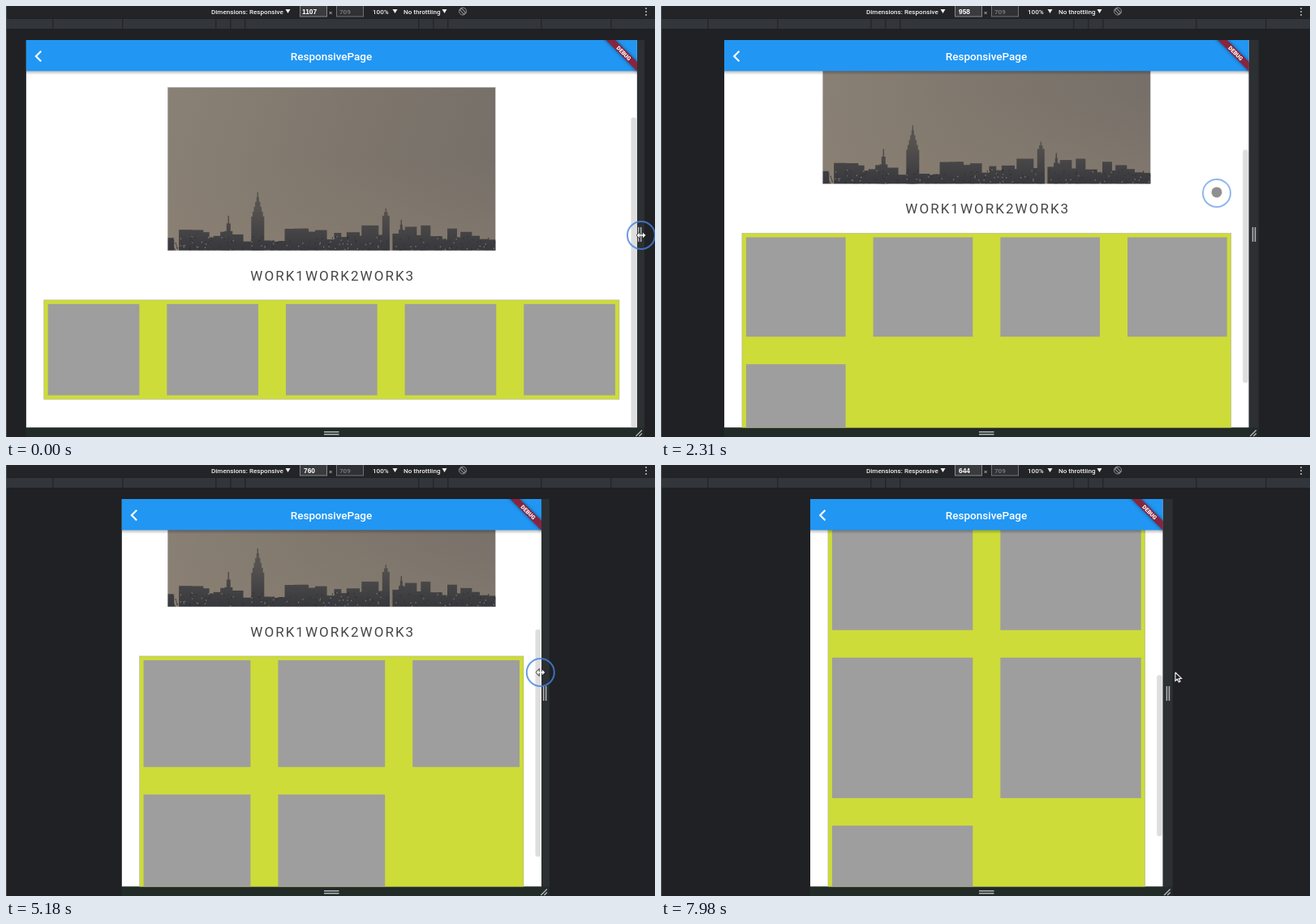
An HTML page with a canvas that plays this animation: 800 by 532 pixels, repeating every 8 s.

```html
<!DOCTYPE html>
<html lang="en">
<head>
<meta charset="utf-8">
<title>Responsive page</title>
<style>
  html, body { margin: 0; width: 100%; height: 100%; overflow: hidden; background: #202124; }
  canvas { display: block; }
</style>
</head>
<body>
<canvas id="stage" width="800" height="532"></canvas>
<script>
const ctx = document.getElementById('stage').getContext('2d');
const LOOP = 8000, CENTER = 401.3, HALF_SCALE = 0.3376, PAGE_LAG = 50;
const TOP = 42, VIEW_TOP = 80, VIEW_BOTTOM = 520.5, VIEW = VIEW_BOTTOM - VIEW_TOP;
const PHOTO_TOP = 86.5, PHOTO_W = 404, PHOTO_H = 201.5, GAP = 34;
const ROBOTO = 'Roboto, sans-serif';

// Pointer stops: time, x, y
const POINTER = [[0, 783, 283], [840, 730, 280], [1850, 685, 319], [2750, 685, 147], [3500, 728, 276],
  [6100, 621, 245], [6700, 611, 272], [6850, 611, 272], [7250, 611, 160], [7950, 637, 262]];

const ramp = (t, from, to) => Math.min(1, Math.max(0, (t - from) / (to - from)));
const easeOut = p => p * (2 - p);

// Width in the toolbar: two steady drags of the right edge
const widthAt = t => 1142 - 184 * ramp(t, -198, 840) - 314 * ramp(t, 3600, 6108);

function layout(width) {
  const columns = width >= 1024 ? 5 : width >= 840 ? 4 : width >= 720 ? 3 : 2;
  const rows = Math.ceil(5 / columns);
  const boxW = 2 * HALF_SCALE * width - 44;
  const cell = (boxW - 10 - GAP * (columns - 1)) / columns;
  const boxH = rows * (cell + GAP) - GAP + 10;
  const photoW = Math.min(PHOTO_W, boxW);
  const photoBottom = PHOTO_TOP + PHOTO_H * photoW / PHOTO_W;
  const total = photoBottom + 61 + boxH + 35;
  return { columns, boxW, boxH, cell, photoW, photoBottom, total, maxScroll: total - VIEW };
}

// Shrinking cells pull the scroll back until a breakpoint adds another row.
function scrollAt(t, width) {
  const afterFirstDrag = layout(Math.max(width, 1024)).maxScroll + 185 * ramp(t, 1850, 2750);
  const limit = layout(Math.max(width, 840)).maxScroll;
  return Math.min(afterFirstDrag, limit) + 204 * easeOut(ramp(t, 6850, 7750));
}

function pointerAt(t) {
  const next = POINTER.findIndex(stop => stop[0] > t);
  if (next < 0) return POINTER[POINTER.length - 1].slice(1);
  const a = POINTER[next - 1], b = POINTER[next], p = ramp(t, a[0], b[0]);
  return [1, 2].map(i => a[i] + (b[i] - a[i]) * p);
}

function rect(x, y, w, h, color) {
  ctx.fillStyle = color;
  ctx.fillRect(x, y, w, h);
}

function outline(x, y, w, h) {
  ctx.strokeStyle = 'rgba(158,158,158,.6)';
  ctx.lineWidth = 0.7;
  ctx.strokeRect(x, y, w, h);
}

function poly(points, color, lineWidth) {
  ctx.beginPath();
  points.forEach(([x, y]) => ctx.lineTo(x, y));
  ctx.fillStyle = ctx.strokeStyle = color;
  ctx.lineWidth = lineWidth || 1;
  if (lineWidth) ctx.stroke();
  else ctx.fill();
}

function circle(x, y, r, color, lineWidth) {
  ctx.beginPath();
  ctx.arc(x, y, r, 0, 2 * Math.PI);
  ctx.fillStyle = ctx.strokeStyle = color;
  ctx.lineWidth = lineWidth || 1;
  if (lineWidth) ctx.stroke();
  else ctx.fill();
}

function text(str, x, y, font, color, align = 'left', spacing = 0) {
  ctx.font = font;
  ctx.fillStyle = color;
  ctx.textAlign = align;
  ctx.letterSpacing = spacing + 'px';
  ctx.fillText(str, x, y);
}

function gradient(x0, y0, x1, y1, ...colors) {
  const g = ctx.createLinearGradient(x0, y0, x1, y1);
  colors.forEach((c, i) => g.addColorStop(i / (colors.length - 1), c));
  return g;
}

function seeded(seed) {
  return () => (seed = (seed * 16807) % 2147483647) / 2147483647;
}

function drawPhoto(x, y, w) {
  const rnd = seeded(41);
  const building = (bx, bw, bh) => rect(bx, PHOTO_H - bh, bw, bh, gradient(0, 150, 0, PHOTO_H, '#56524f', '#37383d'));
  const tower = (cx, bw, low, high, tiers) => {
    for (let i = 0; i <= tiers; i++) {
      const tierW = Math.max(1.5, bw * (1 - i / tiers));
      building(cx - tierW / 2, tierW, low + (high - low) * i / tiers);
    }
  };
  ctx.save();
  ctx.translate(x, y);
  ctx.scale(w / PHOTO_W, w / PHOTO_W);
  ctx.beginPath();
  ctx.rect(0, 0, PHOTO_W, PHOTO_H);
  ctx.clip();
  rect(0, 0, PHOTO_W, PHOTO_H, gradient(0, 0, PHOTO_W, 120, '#8a8176', '#7f776d', '#766f69'));
  rect(0, 90, PHOTO_W, 112, gradient(0, 90, 0, 200, 'rgba(140,128,114,0)', 'rgba(140,128,114,.5)'));
  for (let bx = 0; bx < PHOTO_W; bx += 6 + rnd() * 8) building(bx, 8 + rnd() * 9, 11 + 19 * rnd() ** 1.5);
  tower(75, 10, 24, 43, 2);
  tower(111, 16, 42, 72, 5);
  tower(269, 9, 43, 52, 2);
  tower(288, 6, 26, 38, 2);
  building(239, 21, 31);
  building(312, 12, 31);
  for (let i = 0; i < 200; i++) {
    rect(rnd() * PHOTO_W, PHOTO_H - rnd() * 18, 1.2, 1.5, rnd() > 0.6 ? '#817a72' : '#2f3035');
  }
  ctx.restore();
  outline(x, y, w, PHOTO_H * w / PHOTO_W);
}

function drawToolbar(label) {
  const ui = '500 8.1px ' + ROBOTO, light = '#f0f0f0';
  const menu = (str, x, arrowX) => {
    text(str, x, 9.8, ui, light);
    poly([[arrowX, 4], [arrowX + 6, 4], [arrowX + 3, 9]], light);
  };
  const field = (x, fill, stroke) => {
    rect(x, -1, 33, 14, fill);
    ctx.strokeStyle = stroke;
    ctx.lineWidth = 1;
    ctx.strokeRect(x, -1, 33, 14);
  };
  rect(0, 0, 800, 15, '#232427');
  rect(0, 16, 800, 12, '#32353a');
  for (const offset of [107, 125, 143, 258, 344]) {
    rect(401 - offset, 16, 1.5, 12, '#24272a');
    rect(401 + offset, 16, 1.5, 12, '#24272a');
  }
  rect(0, 0, 1, 532, '#4b4d50');
  menu('Dimensions: Responsive', 253, 344.5);
  menu('100%', 452, 476.5);
  menu('No throttling', 490, 537.5);
  field(362.5, '#3a3b3e', '#85878a');
  field(407.5, '#303134', '#707276');
  text(label, label > 999 ? 365 : 367, 10, 'bold 8.4px "Liberation Sans", sans-serif', '#fff');
  text('×', 398, 10.5, ui, '#aaa');
  text('709', 411, 9.8, ui, '#7d7f82');
  ctx.save();
  ctx.translate(563, 6.5);
  circle(0, 0, 4.5, '#909296', 1);
  ctx.rotate(-Math.PI / 4);
  ctx.strokeRect(-1.5, -3.5, 3, 7);
  ctx.restore();
  for (let y = 3; y <= 11; y += 4) circle(789, y, 1, '#c4c5c7');
}

function drawAppBar(left, right) {
  rect(left, VIEW_TOP, right - left, 5, gradient(0, 80, 0, 85, 'rgba(0,0,0,.28)', 'rgba(0,0,0,0)'));
  rect(left, TOP, right - left, 38.3, '#2196f3');
  poly([[left + 18.5, 55.8], [left + 12.3, 62], [left + 18.5, 68.2]], '#fff', 2.2);
  text('ResponsivePage', 401, 66.8, '500 13.5px ' + ROBOTO, '#fff', 'center');
  ctx.save();
  ctx.translate(right, TOP);
  ctx.rotate(Math.PI / 4);
  ctx.shadowColor = 'rgba(0,0,0,.5)';
  ctx.shadowBlur = 4;
  rect(-30, 19, 60, 8.2, '#87253f');
  ctx.shadowColor = 'transparent';
  text('DEBUG', 0, 25.6, '900 6.9px ' + ROBOTO, '#fff', 'center');
  ctx.restore();
}

function drawPage(left, right, width, t) {
  const { columns, boxW, boxH, cell, photoW, photoBottom, total } = layout(width);
  const scroll = scrollAt(t, width), origin = VIEW_TOP - scroll;
  const boxX = left + 22, boxY = origin + photoBottom + 61;
  ctx.save();
  ctx.beginPath();
  ctx.rect(left, TOP, right - left, VIEW_BOTTOM - TOP);
  ctx.clip();
  rect(left, TOP, right - left, VIEW_BOTTOM - TOP, '#fff');
  rect(boxX, origin + 64, boxW, 1, '#dedede');
  drawPhoto(CENTER - photoW / 2, origin + PHOTO_TOP, photoW);
  text('WORK1WORK2WORK3', 301.3, origin + photoBottom + 36.8, '17px ' + ROBOTO, '#464646', 'left', 2.03);
  rect(boxX, boxY, boxW, boxH, '#cddc39');
  outline(boxX, boxY, boxW, boxH);
  for (let i = 0; i < 5; i++) {
    const col = i % columns, row = Math.floor(i / columns);
    rect(boxX + 5 + col * (cell + GAP), boxY + 5 + row * (cell + GAP), cell, cell, '#9e9e9e');
  }
  if (t < 6500 || t > 6850) {
    const ratio = VIEW / total;
    ctx.beginPath();
    ctx.roundRect(right - 7.5, VIEW_TOP + scroll * ratio, 6.5, VIEW * ratio, 3);
    ctx.fillStyle = 'rgba(205,205,205,.65)';
    ctx.fill();
  }
  drawAppBar(left, right);
  ctx.restore();
}

function drawHandles(left, right) {
  const grip = '#b4b6b8';
  rect(right, TOP, 12, 490, '#2c3033');
  rect(left, VIEW_BOTTOM, right - left + 12, 12, '#232b29');
  for (const i of [0, 1]) {
    rect(392, 525 + 3 * i, 18.5, 1.5, grip);
    rect(right + 4 + 3 * i, 273, 1.5, 18, grip);
    poly([[right + 1.5 + 4 * i, 531], [right + 9, 523.5 + 4 * i]], grip, 1.3);
  }
}

function drawPointer(right, t) {
  const [x, y] = pointerAt(t);
  const resizing = t < 840 || (t > 3560 && t < 6108);
  const scrolling = (t > 1850 && t < 2750) || (t > 6850 && t < 7250);
  if (resizing) circle(x, y, 17, 'rgba(70,130,225,.8)', 2);
  if (scrolling) circle(x, y, 17, 'rgba(115,165,235,.8)', 2);

  if (resizing || (x >= right && x <= right + 12)) {
    for (const side of [-1, 1]) {
      const head = [[x + side * 5.5, y], [x + side * 2, y - 3.5], [x + side * 2, y + 3.5]];
      poly([...head, head[0]], '#222', 1.5);
      poly(head, '#f4f4f4');
    }
    rect(x - 3, y - 0.8, 6, 1.6, '#f4f4f4');
  } else if (x < right) {
    circle(x, y - 1, 6.5, '#8f8f8f');
  } else {
    const arrow = [[0, 0], [0, 10.5], [2.5, 8.3], [4.3, 12], [6, 11.2], [4.4, 7.6], [7.6, 7.4], [0, 0]]
      .map(([dx, dy]) => [x - 3 + dx, y - 6 + dy]);
    poly(arrow, '#1b1b1b');
    poly(arrow, '#eee', 1.2);
  }
}

function frame(now) {
  const t = now % LOOP;
  const width = widthAt(t), pageWidth = widthAt(t - PAGE_LAG);
  const half = HALF_SCALE * pageWidth, left = CENTER - half, right = CENTER + half;
  rect(0, 0, 800, 532, '#202124');
  drawToolbar(Math.round(width));
  drawHandles(left, CENTER + HALF_SCALE * width);
  drawPage(left, right, pageWidth, t);
  drawPointer(right, t);
  requestAnimationFrame(frame);
}

requestAnimationFrame(frame);
</script>
</body>
</html>
```
